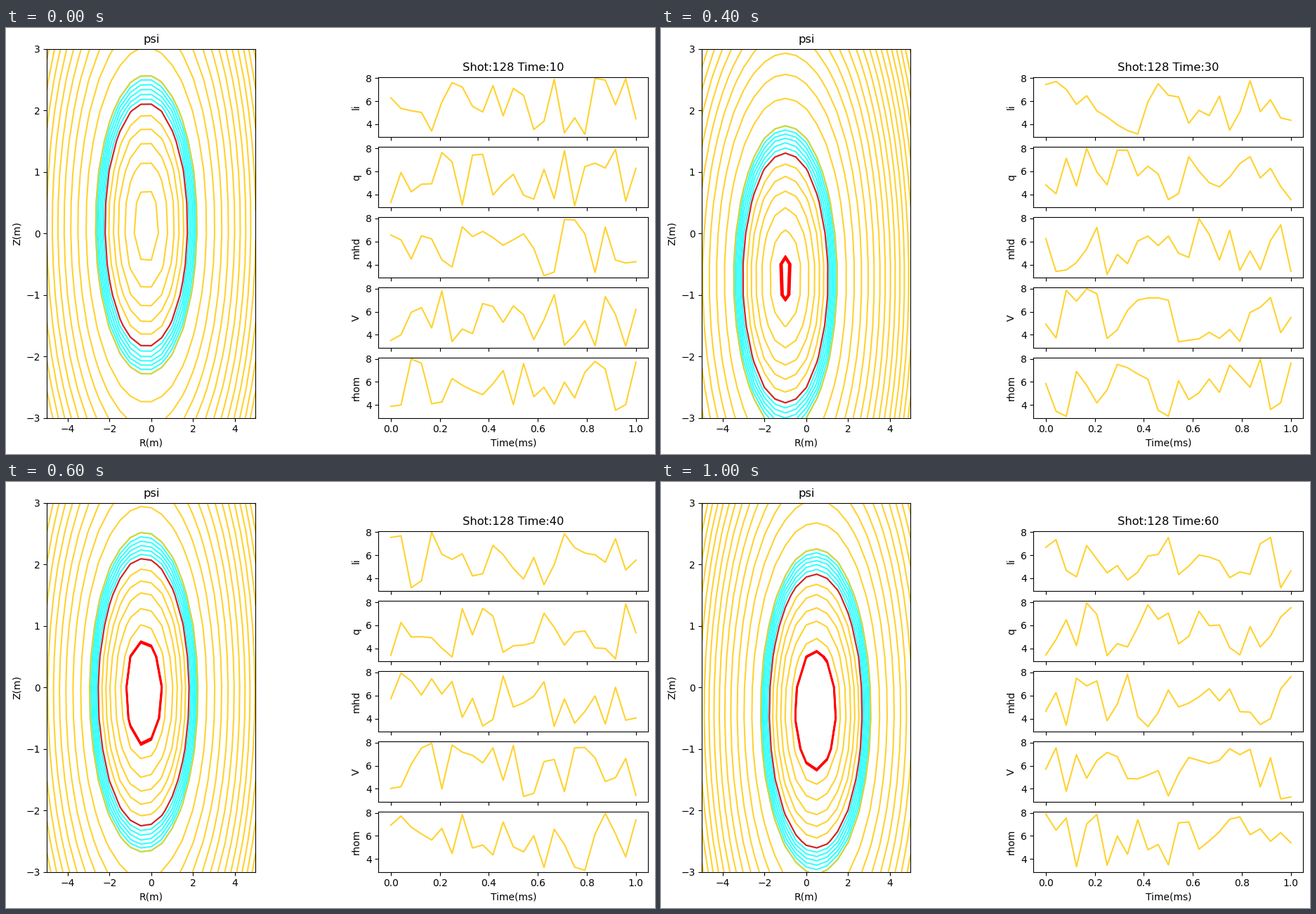
A matplotlib script that plays this animation: 924 by 606 pixels, repeating every 1200 ms.

```python
import matplotlib.pyplot as plt
import numpy as np
from matplotlib.animation import FuncAnimation

WIDTH, HEIGHT = 924, 606
YELLOW, CYAN, RED = "#ffca0a", "#00ffff", "#ff0000"
ALPHA = 0.85
TITLE_SIZE = 11.7
SIGNALS = ["li", "q", "mhd", "V", "rhom"]

# Plasma axis (R, Z) and flux at the separatrix for each time slice
PLASMA = [
    (-0.24, 0.135, 3.96),
    (-0.86, -0.245, 3.58),
    (-1.00, -0.725, 4.18),
    (-0.36, -0.083, 4.78),
    (-0.50, 0.555, 3.32),
    (0.45, -0.383, 5.00),
]

# Flux levels measured from the separatrix
CONTOURS = [
    (CYAN, 0.8, np.linspace(0, 2, 7)),
    (YELLOW, ALPHA, np.concatenate([-0.71 * np.arange(5, 0, -1),
                                    2 + 2.4 * np.arange(20)])),
    (RED, 0.9, np.append(np.linspace(-4.05, -4, 6), 0)),
]

R, Z = np.meshgrid(np.linspace(-5, 5, 21), np.linspace(-3, 3, 13))
TIME = np.linspace(0, 1, 25)
SAMPLES = np.random.default_rng(128).uniform(
    3, 8, (len(PLASMA), len(SIGNALS), TIME.size))

fig = plt.figure(figsize=(WIDTH / 100, HEIGHT / 100), dpi=100, facecolor="white")


def add_axes(left, top, right, bottom):
    """Add axes from pixel edges counted from the top left corner."""
    return fig.add_axes([left / WIDTH, 1 - bottom / HEIGHT,
                         (right - left) / WIDTH, (bottom - top) / HEIGHT])


flux_ax = add_axes(58.3, 29.6, 355.4, 554.7)
flux_ax.set(xlabel="R(m)", ylabel="Z(m)", xlim=(-5, 5), ylim=(-3, 3))
flux_ax.set_title("psi", fontsize=TITLE_SIZE)

signal_axes, lines = [], []
for row, name in enumerate(SIGNALS):
    top = 69.6 + 99.85 * row
    ax = add_axes(530.4, top, 914.3, top + 85.6)
    ax.set(ylabel=name, xlim=(-0.05, 1.05), ylim=(2.88, 8.1), yticks=[4, 6, 8])
    ax.tick_params(labelbottom=row == len(SIGNALS) - 1)
    lines += ax.plot(TIME, SAMPLES[0, row], color=YELLOW, alpha=ALPHA)
    signal_axes.append(ax)
signal_axes[-1].set_xlabel("Time(ms)")

contours = []


def update(index):
    while contours:
        contours.pop().remove()
    r0, z0, separatrix = PLASMA[index]
    psi = (R - r0) ** 2 + (Z - z0) ** 2 - separatrix
    for color, alpha, levels in CONTOURS:
        contours.append(flux_ax.contour(R, Z, psi, levels=levels, colors=[color],
                                        alpha=alpha, linestyles="solid"))
    for line, values in zip(lines, SAMPLES[index]):
        line.set_ydata(values)
    signal_axes[0].set_title(f"Shot:128 Time:{10 * (index + 1)}",
                             fontsize=TITLE_SIZE)
    return lines


anim = FuncAnimation(fig, update, frames=len(PLASMA), interval=200,
                     repeat=True, repeat_delay=0, blit=False)
plt.show()
```
